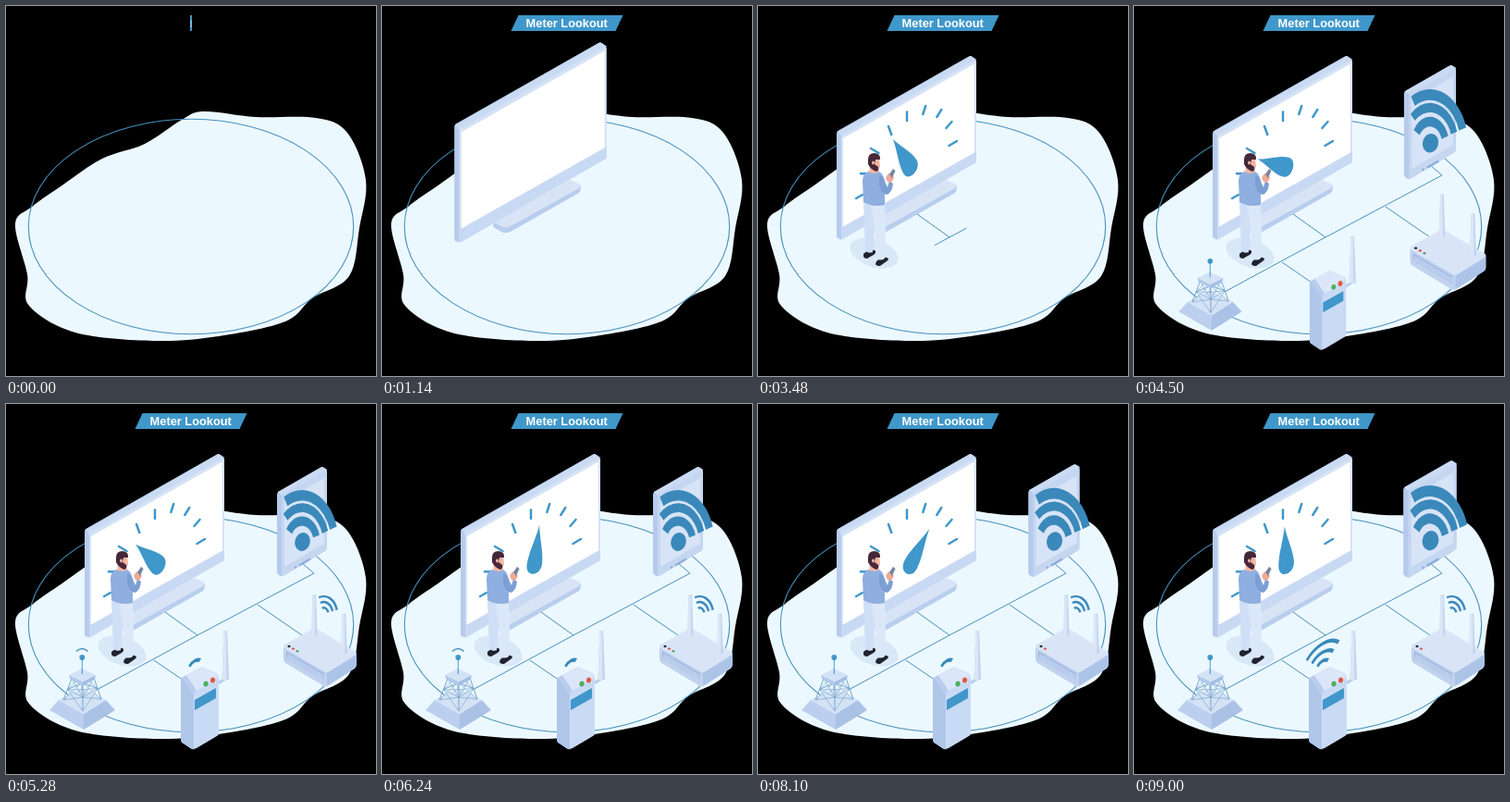
These frames come from a looping animation (400x400 px, 9030 ms). An HTML page with a canvas:

```html
<!DOCTYPE html>
<html lang="en">
<head>
<meta charset="utf-8">
<title>Meter Lookout</title>
<style>
html, body { margin: 0; width: 100%; height: 100%; overflow: hidden; background: #000; }
canvas { display: block; width: 400px; height: 400px; }
</style>
</head>
<body>
<canvas id="stage"></canvas>
<script>
const LOOP = 9030, BEAT = 960;
const BLUE = '#3f97ca', SIGNAL = '#3a89ba', LINE = '#4591bc';
const canvas = document.getElementById('stage');
const c = canvas.getContext('2d');
const dpr = window.devicePixelRatio || 1;
canvas.width = canvas.height = 400 * dpr;

const clamp = v => Math.max(0, Math.min(1, v));
const part = (t, a, b) => clamp((t - a) / (b - a));
const ease = p => (1 - Math.cos(Math.PI * p)) / 2;
const easeOut = p => 1 - (1 - p) * (1 - p);
const frac = v => v - Math.floor(v);

// grows past full size, then settles
function pop(t, start, peak) {
  if (t < peak) return 1.09 * easeOut(part(t, start, peak));
  return 1.09 - 0.09 * ease(part(t, peak, peak + 300));
}

function trace(pts, close) {
  c.beginPath();
  for (let i = 0; i < pts.length; i += 2) c.lineTo(pts[i], pts[i + 1]);
  if (close) c.closePath();
}
function poly(color, ...pts) {
  trace(pts, true);
  c.fillStyle = color;
  c.fill();
}
function line(color, width, ...pts) {
  trace(pts);
  c.strokeStyle = color;
  c.lineWidth = width;
  c.stroke();
}
function oval(color, x, y, rx, ry = rx, turn = 0) {
  c.beginPath();
  c.ellipse(x, y, rx, ry, turn, 0, 7);
  c.fillStyle = color;
  c.fill();
}
function shape(color, d) {
  c.fillStyle = color;
  c.fill(new Path2D(d));
}
function scaled(s, x, y, draw) {
  if (s <= 0) return;
  c.save();
  c.translate(x, y);
  c.scale(s, s);
  c.translate(-x, -y);
  draw();
  c.restore();
}

const BLOB = [10,236, 28,217, 62,193, 104,165, 150,149, 190,123, 214,114, 270,120, 335,121,
  369,137, 389,188, 382,240, 371,292, 331,316, 302,341, 230,357, 160,362, 75,353, 25,324, 23,290];
function backdrop() {
  const n = BLOB.length / 2;
  const pt = i => [BLOB[(i + n) % n * 2], BLOB[(i + n) % n * 2 + 1]];
  c.beginPath();
  c.moveTo(...pt(0));
  for (let i = 0; i < n; i++) {
    const a = pt(i - 1), b = pt(i), d = pt(i + 1), e = pt(i + 2);
    c.bezierCurveTo(b[0] + (d[0] - a[0]) / 6, b[1] + (d[1] - a[1]) / 6,
      d[0] - (e[0] - b[0]) / 6, d[1] - (e[1] - b[1]) / 6, d[0], d[1]);
  }
  c.fillStyle = '#ecf8ff';
  c.fill();
  c.beginPath();
  c.ellipse(200, 238.5, 175.7, 116.2, 0, 0, 7);
  c.strokeStyle = LINE;
  c.lineWidth = 1.1;
  c.stroke();
}

function title(t) {
  c.save();
  c.translate(200, 0);
  c.scale(0.015 + 0.985 * easeOut(part(t, 0, 560)), 1);
  c.translate(-200, 0);
  poly(BLUE, 147.5, 10, 260.5, 10, 252.5, 27, 139.5, 27);
  c.fillStyle = '#fff';
  c.font = 'bold 12.8px "Liberation Sans", Arial, sans-serif';
  c.textAlign = 'center';
  c.fillText('Meter Lookout', 199.7, 23);
  c.restore();
}

function stand() {
  shape('#b9cdee', 'M120 235V238Q121 240 131 245Q135 246 139 244L213 202Q215 200 215 194Z');
  shape('#d8e4f6', 'M121 234L203 188L213 192Q217 194 213 197L139 238Q135 240 131 239Z');
}
function monitor() {
  shape('#b7cbec', 'M85 138Q85 135 88 134L228 54.5Q230 53.5 232 55L236 58L91 252Q89 253 86 251L85 250Z');
  poly('#c9daf3', 86, 136, 229.5, 54, 236, 58, 90, 141);
  shape('#d5e2f6', 'M90 142Q90 140 92 139L234 58.5Q236 58 236 60V167Q236 169 234 170L92 252Q90 253 90 250Z');
  poly('#c8d9f3', 90, 239, 236, 157.5, 236, 169, 90, 252.5);
  poly('#fff', 92, 143, 234, 62.5, 234, 158.5, 92, 238.5);
}

const TICKS = [[106,208,113,204], [111,181.3,121,181], [122,154,130.5,159], [141,130,144.3,139],
  [161,114.5,161,124], [181.2,108,178.3,117], [198.3,112,193.3,120], [209.5,125,203.5,132], [215,146,206.5,151]];
function ticks(t) {
  c.lineCap = 'round';
  TICKS.forEach(([x, y, u, v], i) => {
    const p = part(t, 1250 + 95 * i, 1350 + 95 * i);
    if (p) line(BLUE, 2.5, u, v, u + (x - u) * p, v + (y - v) * p);
  });
  c.lineCap = 'butt';
}
function needle(t) {
  const s = easeOut(part(t, 1400, 1750));
  if (!s) return;
  const wave = t < 3000 ? 0 : -Math.sin((t - 3000) / 6000 * 2 * Math.PI);
  const turn = -10 + wave * (wave < 0 ? 63 : 50);
  const tilt = Math.PI / 9;
  c.save();
  c.translate(164.7, 174.3);
  // the dial lies in a slanted plane
  c.rotate(tilt);
  c.scale(0.72 * s, s);
  c.rotate(turn * Math.PI / 180 - tilt);
  shape(BLUE, 'M0 -45C2 -32 11 -14 11 -1C11 6 6 9.8 0 9.8S-11 6 -11 -1C-11 -14 -2 -32 0 -45Z');
  c.restore();
}

function person(t) {
  const p = ease(part(t, 1500, 2460));
  c.save();
  c.globalAlpha = part(t, 1500, 1650);
  c.translate(-110 * (1 - p), 53 * (1 - p));
  oval('#d8e8f6', 125.5, 267, 27, 15, 0.32);
  shape('#20232f', 'M114 268Q120 263 126 264Q129 266 125 269L118 273Q114 273 114 270Z');
  shape('#20232f', 'M128 276Q134 271 139 272Q143 273 139 276L132 281Q128 281 127 279Z');
  shape('#cfdff6', 'M114 210L129 214L126 245L124 266Q120 268 116 265L115 240Z');
  shape('#dbe8f9', 'M122 212L137 213L138 240L137 273Q132 276 127 273L127 245Z');
  shape('#f2b6a2', 'M121 172L130 172L131 181Q126 185 120 180Z');
  shape('#8eafdf', 'M119 179Q126 183 131 179Q136 182 137 190L137 215Q124 218 114 212L113 190Q113 181 119 179Z');
  shape('#7c9fd3', 'M131 183Q136 184 138 192L140 196L142 189L146 192Q145 202 139 204Q133 202 131 194Z');
  shape('#f0a998', 'M138 186L141 181L145 182L147 186L144 191L140 190Z');
  poly('#75869f', 142, 182, 146, 176, 148.5, 178, 145, 186);
  shape('#f2b6a2', 'M123 165H131L132 173Q131 178 126 177Z');
  shape('#45283a', 'M119 166Q119 159 126 159Q133 160 132 166L127 166L126 171L130 174Q131 178 128 179Q122 177 119 171Z');
  oval('#f2b6a2', 124.5, 169.5, 1.4, 2);
  c.restore();
}

function links(t) {
  const seg = (p, x, y, u, v) => p && line(LINE, 1, x, y, x + (u - x) * p, y + (v - y) * p);
  seg(part(t, 2950, 3350), 172, 225, 207, 250);
  const p = part(t, 3350, 4250);
  seg(p, 207, 250, 333, 183);
  seg(p, 207, 250, 98, 309);
  seg(part(t, 3800, 4150), 160, 277, 195, 301);
  seg(part(t, 3850, 4250), 272, 217, 320, 250);
  seg(part(t, 4230, 4350), 333, 183, 320, 172);
}

function wave(x, y, rx, ry, from, to, width) {
  c.beginPath();
  c.ellipse(x, y, rx, ry, 0, from, to);
  c.strokeStyle = SIGNAL;
  c.lineWidth = width;
  c.stroke();
}

function tablet() {
  shape('#b5caec', 'M293 98Q293 95 296 94L340 68.5Q342 67.5 344 69L347 71L300 186Q297 187 295 185L293 183Z');
  poly('#cbdbf3', 294, 95, 342, 68, 347, 71, 298, 99);
  shape('#c5d6f0', 'M298 101Q298 99 300 98L345 71.5Q347 71 347 73V156Q347 158 345 159L300 186Q298 187 298 184Z');
  poly('#d7e3f6', 301, 105, 344, 80, 344, 151, 301, 176);
  line('#8eaddd', 2.4, 317, 174.5, 329, 167.5);
  oval('#8eaddd', 313, 176.5, 1.3);
  // elliptical bands sharing one centre
  const band = (r, inner, from, to) => {
    c.beginPath();
    c.ellipse(320, 150, 39.5 * r, 57 * r, 0, from, to);
    c.ellipse(320, 150, 39.5 * inner, 57 * inner, 0, to, from, true);
    c.fillStyle = SIGNAL;
    c.fill();
  };
  band(1, 0.8, -2.09, -0.31);
  band(0.75, 0.58, -2.32, -0.31);
  band(0.5, 0.32, -2.6, -0.3);
  oval(SIGNAL, 320.5, 149, 8.2, 10, 0.25);
}

function antenna(x, y, base, w) {
  poly('#c4d5f0', x - 1.8, y, x + 1.8, y, x + w, base, x - w, base);
  poly('#dbe6f7', x - 1.8, y, x + 0.5, y, x + 0.8, base, x - w, base);
}
function router(beat) {
  shape('#c1d2ef', 'M300 262L347 288V305Q345 306 342 304L302 280Q300 278 300 275Z');
  shape('#adc4e9', 'M347 288L379 270V282Q379 284 377 286L349 304L347 305Z');
  shape('#d9e5f7', 'M301 260L330 244Q333 242 337 244L378 268Q380 270 377 272L350 289Q347 291 344 289L301 264Q299 262 301 260Z');
  poly('#a5bbe2', 303, 267, 344, 291, 344, 299, 303, 275);
  poly('#b9cceb', 305, 270, 344, 293, 344, 299, 303, 275);
  antenna(333.3, 206, 250, 3.2);
  antenna(365.5, 226, 270, 3.4);
  oval('#292b38', 306, 262, 1.6, 1.2);
  oval('#d9564a', 310.5, 264.6, 1.6, 1.2);
  if (beat < 0.6) oval('#5c9d69', 315, 267.2, 1.5, 1.2);
}

function tower() {
  poly('#bccfee', 57, 320, 84, 335, 84, 352, 47, 331);
  poly('#abc2e7', 84, 335, 108, 320, 118, 331, 84, 352);
  poly('#d4e2f6', 57, 320, 82, 307, 108, 320, 84, 335);
  const ink = '#6d9ec6';
  const feet = [62, 320, 83, 332, 103, 319, 82, 309];
  const tops = [71, 297, 83, 302, 95, 296, 82, 293];
  for (let i = 0; i < 8; i += 2) {
    const j = (i + 2) % 8;
    const at = (k, p) => [feet[k] + (tops[k] - feet[k]) * p, feet[k + 1] + (tops[k + 1] - feet[k + 1]) * p];
    line(ink, 0.9, ...at(i, 0), ...at(i, 1));
    line(ink, 0.6, ...at(i, 0), ...at(j, 0.5), ...at(i, 1));
    line(ink, 0.6, ...at(j, 0), ...at(i, 0.5), ...at(j, 1));
    line(ink, 0.6, ...at(i, 0.5), ...at(j, 0.5));
  }
  poly('#b2c8ea', 68, 293, 83, 300, 83, 305, 69, 297);
  poly('#a3bde5', 83, 300, 97, 293, 96, 297, 83, 305);
  poly('#d4e2f6', 68, 293, 82, 286, 97, 293, 83, 300.5);
  line(BLUE, 1, 82.3, 275, 82.3, 292);
  oval(BLUE, 82.3, 274, 2.9);
}

function meter() {
  line('#b9cdee', 3, 229, 302, 239, 296);
  antenna(237.3, 245, 298, 3.8);
  shape('#b1c7ea', 'M189 298Q189 296 191 295L204 310V373Q201 374 199 372L190 366Q189 365 189 363Z');
  shape('#c9daf4', 'M203 309L230 294V356Q230 358 228 359L206 372Q204 373 203 372Z');
  shape('#dbe6f8', 'M191 295L209 285Q212 283 215 285L229 291Q231 293 229 296L208 309Q204 311 202 308Z');
  poly('#b9cdee', 190, 296, 195, 293, 206, 310, 203, 315);
  poly(BLUE, 204, 320, 227, 307, 227, 318, 204, 331);
  oval('#4cae5c', 216, 302.5, 2.5, 3, 0.3);
  oval('#e2573f', 223.5, 298.5, 2.5, 3, 0.3);
}

function signals(beat) {
  const steps = (off, n) => Math.floor(frac(beat + off) * n);
  const r = steps(0.8, 3) + 1, m = steps(0.1, 3) + 1, w = steps(0.3, 4);
  for (let i = 1; i <= r; i++) wave(343.5, 226.5, 4.8 * i, 6.2 * i, -1.95, -0.2, 2.4);
  for (let i = 1; i <= w; i++) wave(82.3, 273 - i * 0.4, 4 + 4 * i, 4 + 4 * i, -2.45, -0.7, 1.3);
  c.save();
  c.transform(0.87, -0.5, 0, 1, 204, 287);
  for (let i = 1; i <= m; i++) wave(0, 0, 9.3 * i, 9.3 * i, -2.36, -0.78, 3.8);
  c.restore();
}

function draw(t) {
  const beat = frac((t - 6240) / BEAT + 10);
  c.setTransform(dpr, 0, 0, dpr, 0, 0);
  c.fillStyle = '#000';
  c.fillRect(0, 0, 400, 400);
  backdrop();
  title(t);
  links(t);
  scaled(easeOut(part(t, 350, 750)), 168, 217, stand);
  scaled(pop(t, 450, 1140), 160.5, 217, monitor);
  ticks(t);
  needle(t);
  person(t);
  let size = pop(t, 3990, 4640);
  if (t > 5100) {
    const d = Math.abs(beat - 0.86);
    if (d < 0.14) size += 0.07 * ease(1 - d / 0.14);
  }
  scaled(size, 320, 168, tablet);
  scaled(pop(t, 3990, 4640), 340, 268, () => router(t > 5100 ? beat : 0));
  scaled(pop(t, 4050, 4740), 82, 320, tower);
  scaled(pop(t, 4050, 4740), 211, 335, meter);
  if (t > 5200) signals(beat);
}

const begin = performance.now();
function tick() {
  draw((performance.now() - begin) % LOOP);
  requestAnimationFrame(tick);
}
tick();
</script>
</body>
</html>
```
